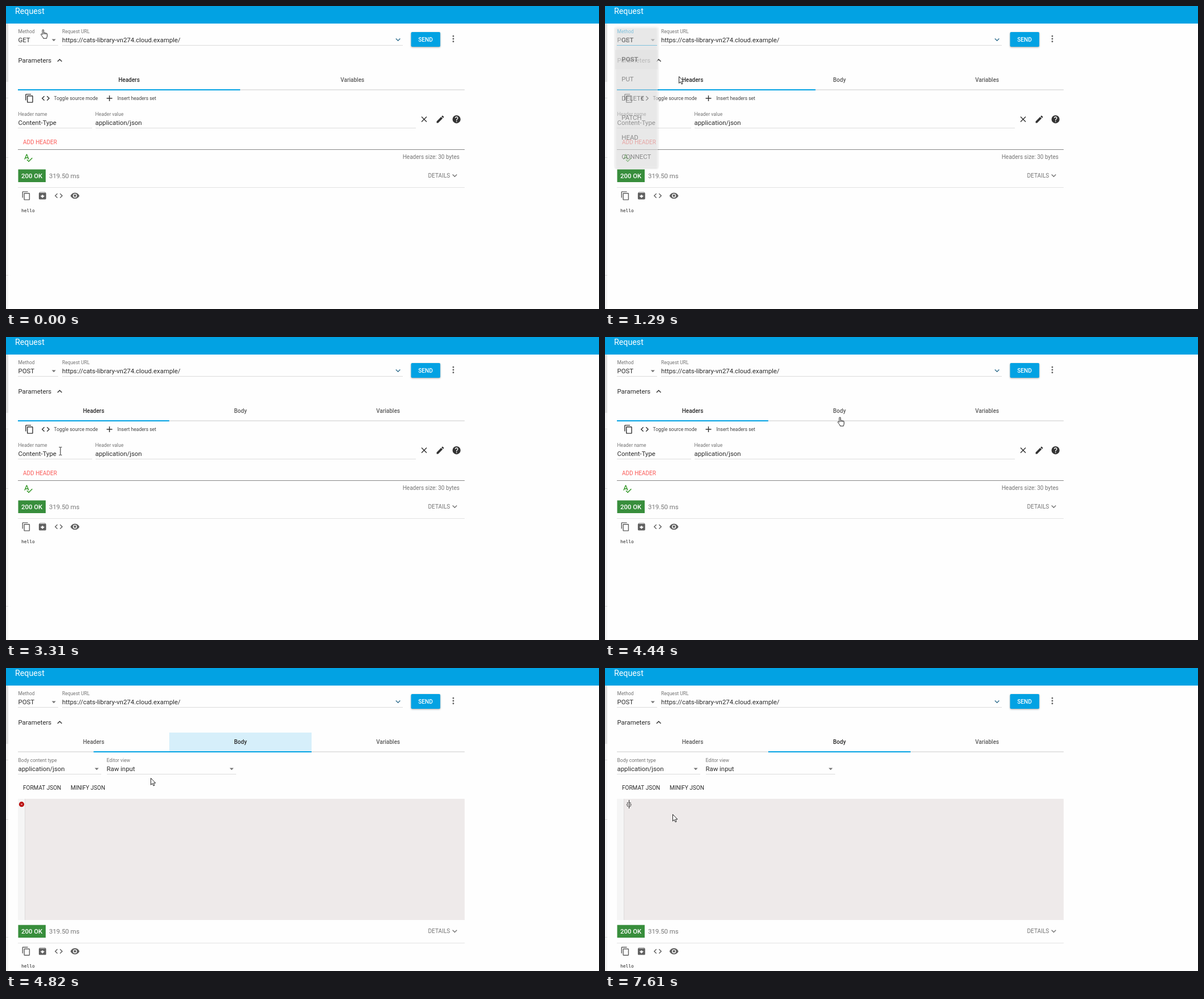
An HTML page with a canvas for the animation above (8000 ms loop, 1046 px wide and 535 px high).

```html
<!DOCTYPE html>
<html lang="en">
<head>
<meta charset="utf-8">
<title>Request</title>
<style>
html, body { margin: 0; width: 100%; height: 100%; overflow: hidden; background: #fefefe; }
canvas { display: block; }
</style>
</head>
<body>
<canvas id="stage" width="1046" height="535"></canvas>
<script>
const ctx = document.getElementById('stage').getContext('2d');
const LOOP = 8000;
const BLUE = '#02a2e3', INK = '#2b2b2b', GREY = '#757575', RULE = '#dcdcdc';
const SANS = 'Roboto, sans-serif', MONO = '"DejaVu Sans Mono", monospace';
const METHODS = ['GET', 'POST', 'PUT', 'DELETE', 'PATCH', 'HEAD', 'CONNECT', 'OPTIONS', 'TRACE', 'Custom'];

const ICON = {
  copy: 'M16 1H4c-1.1 0-2 .9-2 2v14h2V3h12V1zm3 4H8c-1.1 0-2 .9-2 2v14c0 1.1.9 2 2 2h11c1.1 0 2-.9 2-2V7c0-1.1-.9-2-2-2zm0 16H8V7h11v14z',
  code: 'M9.4 16.6L4.8 12l4.6-4.6L8 6l-6 6 6 6 1.4-1.4zm5.2 0l4.6-4.6-4.6-4.6L16 6l6 6-6 6-1.4-1.4z',
  add: 'M19 13h-6v6h-2v-6H5v-2h6V5h2v6h6v2z',
  close: 'M19 6.4L17.6 5 12 10.6 6.4 5 5 6.4 10.6 12 5 17.6 6.4 19 12 13.4 17.6 19 19 17.6 13.4 12z',
  edit: 'M3 17.25V21h3.75L17.8 9.94l-3.75-3.75L3 17.25zM20.7 7.04c.4-.4.4-1 0-1.4l-2.34-2.35c-.4-.4-1-.4-1.4 0l-1.83 1.83 3.75 3.75 1.82-1.83z',
  help: 'M12 2a10 10 0 1 0 0 20a10 10 0 1 0 0-20zm1 17h-2v-2h2v2zm2.07-7.75l-.9.92C13.45 12.9 13 13.5 13 15h-2v-.5c0-1.1.45-2.1 1.17-2.83l1.24-1.26c.37-.36.59-.86.59-1.41 0-1.1-.9-2-2-2s-2 .9-2 2H8c0-2.2 1.8-4 4-4s4 1.8 4 4c0 .88-.36 1.68-.93 2.25z',
  spell: 'M12.45 16h2.1L9.43 3H7.57L2.46 16h2.1l1.1-3h5.65l1.14 3zm-6.02-5L8.5 5.5 10.57 11H6.43zm15.16.6l-8.1 8.08L9.84 16l-1.4 1.4 5.08 5.1L23 13l-1.4-1.4z',
  archive: 'M20.5 5.2l-1.4-1.65C18.9 3.2 18.5 3 18 3H6c-.5 0-.9.2-1.2.55L3.5 5.2C3.2 5.6 3 6 3 6.5V19c0 1.1.9 2 2 2h14c1.1 0 2-.9 2-2V6.5c0-.5-.2-.9-.5-1.3zM12 17.5L6.5 12H10v-2h4v2h3.5L12 17.5zM5.1 5l.8-1h12l1 1H5.1z',
  eye: 'M12 4.5C7 4.5 2.7 7.6 1 12c1.7 4.4 6 7.5 11 7.5s9.3-3.1 11-7.5c-1.7-4.4-6-7.5-11-7.5zM12 17a5 5 0 1 1 0-10a5 5 0 1 1 0 10zm0-8a3 3 0 1 0 0 6a3 3 0 1 0 0-6z',
  more: 'M16.6 8.6L12 13.2 7.4 8.6 6 10l6 6 6-6z',
  less: 'M12 8l-6 6 1.4 1.4L12 10.8l4.6 4.6L18 14z',
  drop: 'M7 10l5 5 5-5z',
  dots: 'M12 3.3a2 2 0 1 0 0 4a2 2 0 1 0 0-4zm0 6.7a2 2 0 1 0 0 4a2 2 0 1 0 0-4zm0 6.7a2 2 0 1 0 0 4a2 2 0 1 0 0-4z'
};
for (const name in ICON) ICON[name] = new Path2D(ICON[name]);

const POINTER = {
  arrow: new Path2D('M.5 .5V12.4L3.2 9.8 5.1 14 7 13.2 5.2 9.1H8.8z'),
  hand: new Path2D('M3.2 9.5V1.9a1.2 1.2 0 0 1 2.4 0V6.6c.5-.8 1.9-.7 2.2.3c.6-.6 1.8-.4 2 .5c.8-.4 1.9 0 1.9 1.1V12c0 1.5-1 2.2-1 4.2H4.8c0-1.6-1.6-3-2.6-4.4C1.4 10.6.5 9.6.6 8.9c.3-.9 1.5-.6 2.6.6z'),
  beam: new Path2D('M.5 .5H2.3L3 1.2 3.7 .5H5.5M3 1.2V13.8M.5 14.5H2.3L3 13.8 3.7 14.5H5.5')
};

// Pointer moves: start time, number of steps, end point, shape
const MOVES = [
  [0, 1, 61, 41, 'hand'], [120, 1, 56, 48, 'hand'],
  [270, 3, 48, 56, 'arrow'], [650, 3, 50, 87, 'arrow'],
  [1170, 4, 210, 160, 'arrow'], [1680, 2, 90, 345, 'arrow'],
  [1950, 2, 88, 377, 'arrow'], [2190, 1, 88, 373, 'arrow'],
  [2310, 4, 68, 88, 'arrow'], [2790, 2, 194, 138, 'arrow'],
  [3030, 1, 187, 141, 'hand'], [3170, 1, 97, 190, 'beam'],
  [3310, 1, 93, 194, 'beam'], [3450, 2, 66, 233, 'hand'],
  [3840, 5, 411, 137, 'hand'], [4440, 1, 410, 141, 'hand'],
  [4580, 1, 410, 142, 'hand'], [4700, 4, 100, 246, 'arrow'],
  [5180, 1, 96, 248, 'arrow'], [5460, 3, 119, 258, 'arrow']
];

const steps = (t, start, n) => Math.max(0, Math.min(n, Math.floor((t - start) / 120) + 1));
const mix = (a, b, k) => a + (b - a) * k;

function rect(x, y, w, h, color) {
  ctx.fillStyle = color;
  ctx.fillRect(x, y, w, h);
}

function text(str, x, mid, size, color = INK, weight = 400, align = 'left', family = SANS) {
  ctx.font = `${weight} ${size}px ${family}`;
  ctx.textAlign = align;
  ctx.fillStyle = color;
  ctx.fillText(str, x, mid + size * 0.355);
}

const body = (str, x, mid, color, weight) => text(str, x, mid, 11.4, color, weight);
const small = (str, x, mid, color = GREY) => text(str, x, mid, 8.55, color);
const rule = (x1, x2, y, color = RULE) => rect(x1, y, x2 - x1, 1, color);

function icon(name, cx, cy, color = '#333') {
  const k = 17.1 / 24;
  ctx.save();
  ctx.translate(cx - 8.55, cy - 8.55);
  ctx.scale(k, k);
  ctx.fillStyle = color;
  ctx.fill(ICON[name], 'evenodd');
  ctx.restore();
}

function box(x, y, w, h, r, color, blur) {
  ctx.save();
  if (blur) {
    ctx.shadowColor = 'rgba(0,0,0,.35)';
    ctx.shadowBlur = blur;
    ctx.shadowOffsetY = 1;
  }
  ctx.fillStyle = color;
  ctx.beginPath();
  ctx.roundRect(x, y, w, h, r);
  ctx.fill();
  ctx.restore();
}

function drawFrame() {
  rect(0, 0, 1046, 535, '#fefefe');
  rect(0, 31, 4, 504, '#f5f5f5');
  rect(0, 31, 4, 103, '#e1e1e1');
  for (const y of [162, 267, 475]) rule(0, 4, y, '#d8d8d8');
  rect(0, 0, 1046, 31, BLUE);
  text('Request', 16, 9, 14.25, '#fff');
}

function drawRequest(t, post) {
  const focus = t >= 270 && t < 2070;
  small('Method', 21.5, 45, focus ? BLUE : GREY);
  body(post ? 'POST' : 'GET', 21.5, 60);
  icon('drop', 84.3, 60, GREY);
  rule(21, 92, 69, focus ? BLUE : RULE);
  small('Request URL', 99, 45);
  body('https://cats-library-vn274.cloud.example/', 99, 60);
  icon('more', 691.5, 59.5, '#34708f');
  rule(99, 700, 69);
  box(714.5, 46, 51.5, 26, 2, BLUE, 3);
  text('SEND', 740, 59, 10.1, '#fff', 500, 'center');
  icon('dots', 789, 58, '#616161');
  body('Parameters', 21.5, 96);
  icon('less', 94.7, 96);
}

function drawTabs(t, post, bodyTab) {
  const edges = post ? [21, 288, 539, 809] : [21, 413, 809];
  const names = post ? ['Headers', 'Body', 'Variables'] : ['Headers', 'Variables'];
  const active = bodyTab ? 1 : 0;
  const n = steps(t, 4580, 6);
  if (n) {
    ctx.save();
    ctx.beginPath();
    ctx.rect(288, 114, 251, 33);
    ctx.clip();
    ctx.globalAlpha = 0.21 * Math.min(1, (6 - n) / 4);
    ctx.fillStyle = BLUE;
    ctx.beginPath();
    ctx.arc(414, 148, 104 + 70 * (n - 1), 0, 7);
    ctx.fill();
    ctx.restore();
  }
  names.forEach((name, i) => {
    const mid = (edges[i] + edges[i + 1]) / 2;
    text(name, mid, 130, 10, i === active ? INK : '#5c5c5c', 500, 'center');
  });
  rect(21, 147, 788, 2, '#e4e4e4');
  // The bar stretches over both tabs, then lets go of the first
  let left = 21, right = post ? mix(413, 288, steps(t, 1290, 3) / 3) : 413;
  if (n) {
    right = n === 1 ? 348 : 539;
    left = mix(21, 288, Math.max(0, Math.min(1, (n - 2) / 2)));
  }
  rect(left, 147, right - left, 2, BLUE);
}

function drawHeaders() {
  icon('copy', 41.3, 163);
  icon('code', 70, 163);
  small('Toggle source mode', 84.5, 162.5, '#444');
  icon('add', 182.5, 163);
  small('Insert headers set', 196.5, 162.5, '#444');
  small('Header name', 21.5, 191);
  body('Content-Type', 21.5, 206);
  rule(21, 152, 215);
  small('Header value', 157.5, 191);
  body('application/json', 157.5, 206);
  rule(158, 723, 215);
  icon('close', 737.5, 200);
  icon('edit', 766, 200);
  icon('help', 794.7, 200);
  text('ADD HEADER', 30, 240, 10, '#fb5a57');
  rule(21, 809, 253, '#858585');
  icon('spell', 39, 268, '#2f9422');
  text('Headers size: 30 bytes', 800, 266.5, 10, GREY, 400, 'right');
}

function drawEditor(t) {
  small('Body content type', 21.5, 162.5);
  body('application/json', 21.5, 177.5);
  icon('drop', 160, 178, GREY);
  rule(21, 168, 187);
  small('Editor view', 177.5, 162.5);
  body('Raw input', 177.5, 177.5);
  icon('drop', 398, 178, GREY);
  rule(178, 406, 187);
  text('FORMAT JSON', 30, 211.5, 10);
  text('MINIFY JSON', 114, 211.5, 10);

  rect(21.5, 231, 787.5, 214, '#eeeaea');
  rect(21.5, 231, 11.5, 214, '#f5f5f5');
  rect(33, 231, 1, 214, '#dedbdb');
  if (t < 7610) {
    ctx.fillStyle = '#b90c0c';
    ctx.beginPath();
    ctx.arc(27.5, 240.7, 4.6, 0, 7);
    ctx.fill();
    ctx.strokeStyle = '#f3c9c9';
    ctx.lineWidth = 1;
    ctx.stroke(new Path2D('M26 239.2l3 3m0-3l-3 3'));
  }
  const typed = t >= 6980;
  if (typed) text('{}', 36.5, 240.5, 9.5, '#333', 400, 'left', MONO);
  const lit = (t >= 5180 && t < 5700) || (t >= 6230 && t < 6730) || (typed && t < 7100) || t >= 7610;
  if (lit) rect(typed ? 42 : 36, 233, 1, 15, '#222');
}

function drawResponse(y) {
  const tint = '#5f5f5f';
  rect(21.5, y - 11, 48.5, 22.5, '#388e3c');
  body('200 OK', 27, y, '#fff', 500);
  body('319.50 ms', 76, y, GREY);
  text('DETAILS', 744.5, y, 10.1, GREY);
  icon('more', 791.5, y, GREY);
  rule(21, 809, y + 20.5, '#e2e2e2');
  ['copy', 'archive', 'code', 'eye'].forEach((name, i) => icon(name, 35.7 + 28.65 * i, y + 35.5, tint));
  text('hello', 27, y + 61.5, 7.9, '#222', 400, 'left', MONO);
}

function drawMenu(t) {
  if (t < 270 || t >= 1410) return;
  const n = steps(t, 270, 3);
  let open = t < 650 ? 0.2 + 0.25 * n : 1;
  let alpha = t < 650 ? Math.min(1, 0.4 * n) : 1;
  if (t >= 1290) {
    open = 0.7;
    alpha = 0.5;
  }
  const h = 355 * open, picked = t >= 1170 ? 1 : 0;
  ctx.save();
  ctx.globalAlpha = alpha;
  box(18, 37, 75, h, 1.5, '#fff', 3.5);
  ctx.beginPath();
  ctx.rect(18, 37, 75, h);
  ctx.clip();
  METHODS.forEach((name, i) => {
    const mid = 60 + 34.33 * i;
    if (i === picked) rect(18, mid - 17, 75, 34.3, '#e1e1e1');
    body(name, 29.3, mid, INK, i === picked ? 700 : 400);
  });
  ctx.restore();
}

function drawPointer(t) {
  let i = MOVES.length - 1;
  while (MOVES[i][0] > t) i--;
  const [start, n, x, y, shape] = MOVES[i];
  const from = MOVES[Math.max(0, i - 1)];
  const k = steps(t, start, n) / n;
  ctx.save();
  ctx.translate(Math.round(mix(from[2], x, k)), Math.round(mix(from[3], y, k)));
  ctx.fillStyle = '#fff';
  ctx.strokeStyle = '#222';
  ctx.lineWidth = 1;
  if (shape !== 'beam') ctx.fill(POINTER[shape]);
  ctx.stroke(POINTER[shape]);
  if (shape === 'hand') ctx.stroke(new Path2D('M5.6 6.6V9M7.8 7V9M9.8 7.5V9.2'));
  ctx.restore();
}

function draw(t) {
  const post = t >= 1290, bodyTab = t >= 4580;
  drawFrame();
  drawRequest(t, post);
  drawTabs(t, post, bodyTab);
  if (bodyTab) drawEditor(t);
  else drawHeaders();
  drawResponse(bodyTab ? 464.7 : 299.5);
  drawMenu(t);
  drawPointer(t);
}

function tick() {
  draw(performance.now() % LOOP);
  requestAnimationFrame(tick);
}
tick();
</script>
</body>
</html>
```
